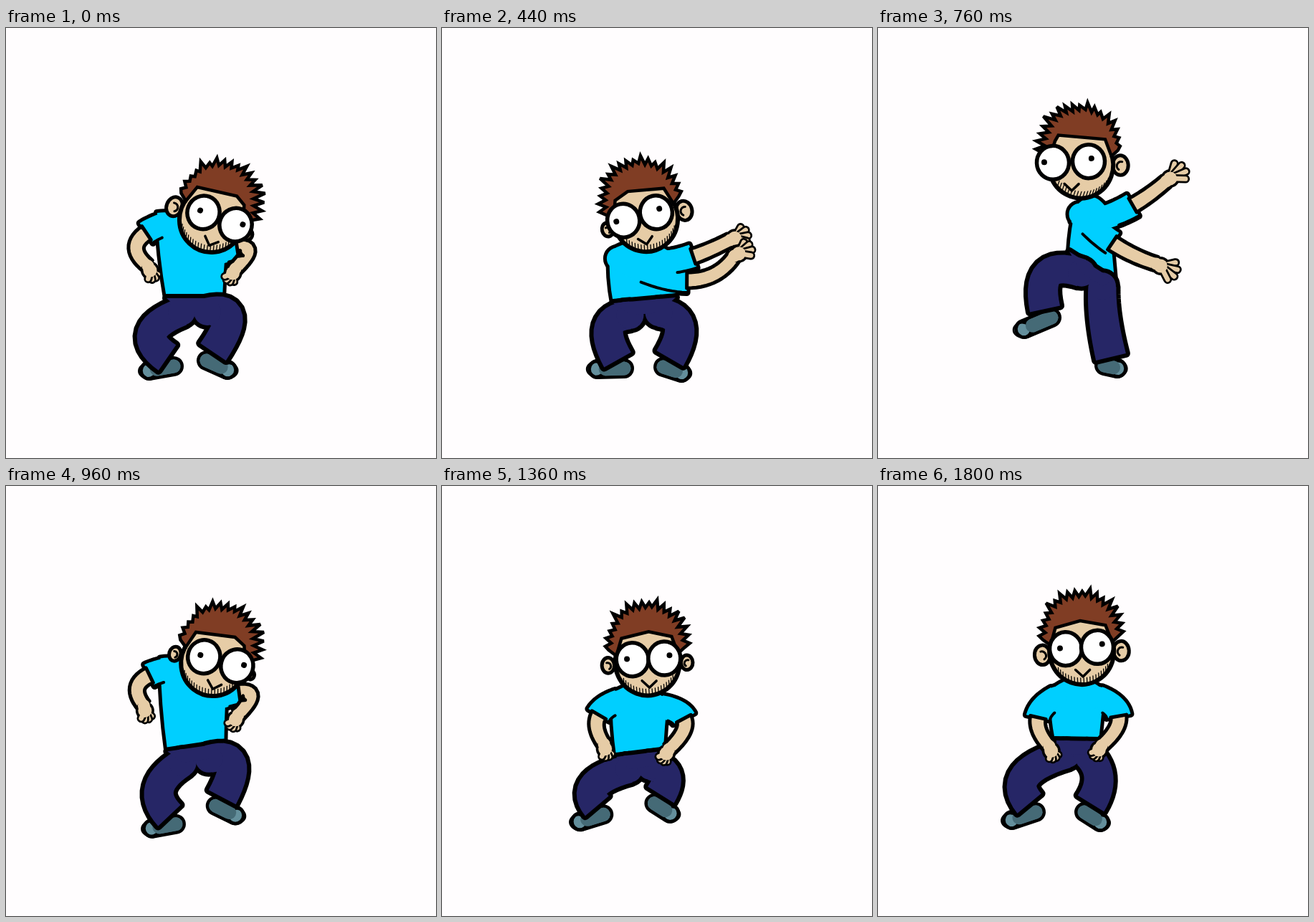
Write an HTML page with a canvas that moves like this. It is 600x600 px and loops after 1.84 s.

```html
<!DOCTYPE html>
<html lang="en">
<head>
<meta charset="utf-8">
<title>Dance</title>
<style>
html, body { margin: 0; width: 100%; height: 100%; overflow: hidden; background: #fffdfe; }
canvas { display: block; width: 100vw; height: 100vh; }
</style>
</head>
<body>
<canvas id="stage" width="600" height="600"></canvas>
<script>
const g = document.getElementById('stage').getContext('2d');
const INK = '#000', SKIN = '#e6cca6', SHIRT = '#00cfff', PANTS = '#262666',
  HAIR = '#803d24', SHOE = '#456a76', TOE = '#648f9c', PAPER = '#fffdfe';
const LOOP = 1840, STEP = 40;

// head: x, y between the eyes, tilt, turn (-1 left, 1 right), ear size
// chest, waist: left and right corner; arms: elbow, wrist; legs: knee, ankle, toe
// cuff: where the sleeve ends along the arm and how far the fingers reach
const crouch = {
  head: [298, 266, 21, .7, 1], chest: [211, 258, 306, 312], waist: [224, 377, 302, 377],
  armA: [183, 300, 198, 332], armB: [336, 308, 320, 336],
  legL: [204, 426, 225, 460, 200, 478], legR: [310, 404, 289, 452, 309, 477], cuff: [.25, 6] };
const reach = {
  head: [298, 188, 0, 1, 1], chest: [236, 256, 302, 258], waist: [221, 358, 302, 324],
  armA: [297, 300, 340, 270], armB: [338, 224, 368, 184],
  legL: [238, 412, 221, 464, 269, 475], legR: [328, 348, 316, 393, 361, 413], cuff: [.45, 20] };
const clap = {
  head: [276, 263, -14, -.5, 1], chest: [234, 312, 325, 318], waist: [239, 384, 326, 376],
  armA: [345, 352, 408, 318], armB: [352, 318, 402, 296],
  legL: [233, 418, 245, 463, 217, 476], legR: [331, 416, 318, 461, 334, 481], cuff: [.48, 12] };
const open = {
  head: [269, 187, -2, -1, 1], chest: [276, 250, 322, 256], waist: [267, 312, 330, 352],
  armA: [330, 302, 388, 329], armB: [358, 246, 402, 214],
  legL: [238, 343, 233, 392, 204, 420], legR: [315, 405, 325, 459, 334, 475], cuff: [.47, 17] };
const kick = {
  head: [303, 186, 1, .5, 0], chest: [228, 192, 308, 240], waist: [229, 352, 311, 308],
  armA: [194, 207, 177, 236], armB: [350, 238, 334, 274],
  legL: [242, 410, 236, 459, 215, 477], legR: [328, 341, 337, 385, 350, 411], cuff: [.25, 6] };
const cross = {
  head: [266, 196, -6, -1, 1], chest: [247, 264, 333, 262], waist: [246, 326, 320, 334],
  armA: [248, 298, 241, 306], armB: [282, 309, 338, 310],
  legL: [231, 355, 226, 402, 190, 416], legR: [312, 402, 324, 456, 335, 475], cuff: [.45, 10] };
const squat = {
  head: [284, 226, -3, 0, 1], chest: [240, 286, 316, 286], waist: [247, 355, 308, 356],
  armA: [223, 325, 239, 363], armB: [336, 323, 312, 362],
  legL: [206, 404, 211, 443, 187, 466], legR: [308, 406, 297, 443, 310, 469], cuff: [.47, 5] };
const swing = { ...cross, head: [270, 192, -4, -.5, 1], armA: [208, 286, 176, 284] };

// Lowers the body while the feet stay.
function sink(pose, by) {
  const down = list => list.map((v, i) => i % 2 ? v + by : v);
  const out = { ...pose };
  for (const k of ['chest', 'waist', 'armA', 'armB']) out[k] = down(pose[k]);
  out.head = pose.head.map((v, i) => i === 1 ? v + by : v);
  for (const k of ['legL', 'legR']) out[k] = pose[k].map((v, i) => i === 1 ? v + by / 2 : v);
  return out;
}

const keys = [[0, crouch], [280, reach], [440, clap], [480, clap], [760, open], [920, crouch],
  [1200, kick], [1380, sink(squat, 30)], [1520, cross], [1680, swing], [1800, squat], [LOOP, crouch]];

// Fast off the floor, faster and faster on the way down.
function poseAt(t) {
  const i = keys.findIndex((k, n) => t < keys[n + 1][0]);
  const [t0, a] = keys[i], [t1, b] = keys[i + 1];
  const k = (t - t0) / (t1 - t0);
  const e = b.head[1] < a.head[1] ? 1 - (1 - k) ** 2 : k * k;
  const p = {};
  for (const part in a) p[part] = a[part].map((v, j) => v + (b[part][j] - v) * e);
  return p;
}

const mix = (a, b, k) => [a[0] + (b[0] - a[0]) * k, a[1] + (b[1] - a[1]) * k];
const dist = (a, b) => Math.hypot(a[0] - b[0], a[1] - b[1]);
const points = flat => flat.flatMap((v, i) => i % 2 ? [] : [[v, flat[i + 1]]]);
const range = (n, f) => Array.from({ length: n }, (_, i) => f(i));
const noise = i => Math.abs(Math.sin(i * 78.233) * 43758.5) % 1;

function shape(pts, closed = true) {
  const path = new Path2D();
  pts.forEach(p => path.lineTo(...p));
  if (closed) path.closePath();
  return path;
}
function oval(x, y, rx, ry = rx) {
  const path = new Path2D();
  path.ellipse(x, y, rx, ry, 0, 0, 7);
  return path;
}
function fill(path, color) { g.fillStyle = color; g.fill(path); }
function line(path, width, color = INK) { g.strokeStyle = color; g.lineWidth = width; g.stroke(path); }
function both(path, color, width) { fill(path, color); line(path, width); }
function merged(paths, color, width) {
  paths.forEach(p => line(p, width));
  paths.forEach(p => fill(p, color));
}

// Both edges of a limb that bends from a through m to b, between t0 and t1.
function limb(a, m, b, w0, w1, t0 = 0, t1 = 1) {
  const c = [0, 1].map(d => 2 * m[d] - (a[d] + b[d]) / 2);
  const edges = [[], []];
  for (let i = 0; i <= 14; i++) {
    const t = t0 + (t1 - t0) * i / 14, w = (w0 + (w1 - w0) * t) / 2;
    const [x, y] = mix(mix(a, c, t), mix(c, b, t), t);
    const q = mix([c[0] - a[0], c[1] - a[1]], [b[0] - c[0], b[1] - c[1]], t);
    const len = Math.hypot(...q) || 1;
    edges[0].push([x - q[1] / len * w, y + q[0] / len * w]);
    edges[1].push([x + q[1] / len * w, y - q[0] / len * w]);
  }
  return edges;
}
const tube = ([l, r]) => shape(l.concat([...r].reverse()));

function shoe([, ankle, toe]) {
  const side = Math.sign(toe[0] - ankle[0]);
  const heel = [ankle[0] - side * 9, ankle[1] + 12];
  const sole = shape([heel, toe], false);
  line(sole, 28);
  line(sole, 19, SHOE);
  const cap = oval(...mix(heel, toe, 1.08), 12, 10);
  both(cap, TOE, 2.5);
  line(oval(...toe, 11.5), 4.5);
  line(shape([heel, mix(heel, toe, .7)], false), 19, SHOE);
}

function legs(p) {
  const [wl, wr] = points(p.waist);
  const hip = k => { const [x, y] = mix(wl, wr, k); return [x, y + 19]; };
  const hips = [hip(.27), hip(.73)];
  const parts = ['legL', 'legR'].map((key, i) => {
    const [knee, ankle] = points(p[key]);
    return tube(limb(hips[i], knee, ankle, 39, 43));
  });
  const pelvis = shape([wl, wr, mix(hips[1], wr, .2), hips[1], hips[0], mix(hips[0], wl, .2)]);
  merged([...parts, ...hips.map(h => oval(...h, 19)), pelvis], PANTS, 12);
}

function hand(elbow, wrist, len) {
  const a = Math.atan2(wrist[1] - elbow[1], wrist[0] - elbow[0]);
  const at = (r, f) => [wrist[0] + 7 * Math.cos(a) + r * Math.cos(f), wrist[1] + 7 * Math.sin(a) + r * Math.sin(f)];
  fill(oval(...at(0, 0), 13), INK);
  for (let i = 0; i < 4; i++) {
    const f = a + (i - 1.5) * .44;
    const finger = shape([at(4, f), at(7 + len * (i % 3 ? 1 : .85), f)], false);
    line(finger, 12);
    line(finger, 6.5, SKIN);
  }
  fill(oval(...at(0, 0), 9.5), SKIN);
  fill(oval(...wrist, 8.5), SKIN);
}

function shirtAndArms(p) {
  const [cl, cr] = points(p.chest), [wl, wr] = points(p.waist), [cuff, len] = p.cuff;
  const mid = mix(mix(wl, wr, .5), mix(cl, cr, .5), .5);
  const arms = [['armA', .12], ['armB', .88]].map(([key, k]) => {
    const [elbow, wrist] = points(p[key]), [x, y] = mix(cl, cr, k), from = [x, y + 9];
    return { elbow, wrist, from, sleeve: limb(from, elbow, wrist, 32, 36, 0, cuff),
      skin: limb(from, elbow, wrist, 24, 20, cuff) };
  });
  const torso = new Path2D(), neck = mix(cl, cr, .5);
  torso.moveTo(...wl);
  torso.quadraticCurveTo(...mix(mid, mix(wl, cl, .5), 1.1), ...cl);
  torso.quadraticCurveTo(neck[0], neck[1] - 34, ...cr);
  torso.quadraticCurveTo(...mix(mid, mix(wr, cr, .5), .98), ...wr);
  torso.closePath();
  merged([torso, ...arms.flatMap(a => [tube(a.sleeve), oval(...a.from, 15)])], SHIRT, 10);
  arms.forEach(({ sleeve }) => {
    const inner = sleeve[dist(sleeve[0][7], mid) < dist(sleeve[1][7], mid) ? 0 : 1];
    line(shape(inner.slice(5), false), 4);
  });
  legs(p);
  arms.reverse().forEach(a => {
    both(tube(a.skin), SKIN, 5);
    hand(a.elbow, a.wrist, len);
  });
}

function head([x, y, tilt, turn, earSize]) {
  const cx = -14 * turn;
  g.save();
  g.translate(x, y);
  g.rotate(tilt * Math.PI / 180);

  for (const side of [-1, 1]) {
    const r = 11 * earSize * Math.min(1, Math.sqrt(Math.max(0, 1 - side * turn)));
    if (r < 3) continue;
    const ex = cx + side * 55, curl = new Path2D();
    both(oval(ex, 7, r, r * 1.25), SKIN, 5);
    curl.arc(ex + side, 8, r * .55, side > 0 ? 2.2 : -1.8, side > 0 ? 5 : 1);
    line(curl, 3);
  }

  const jaw = new Path2D();
  jaw.ellipse(cx, 5, 45, 46, 0, -.4, Math.PI + .4);
  fill(oval(cx, 5, 45, 46), SKIN);
  line(jaw, 6);
  range(19, i => .65 + i * .1).forEach(a => {
    const px = cx + 44 * Math.cos(a), py = 5 + 45 * Math.sin(a);
    line(shape([[px, py], [px - 3 * turn, py - 8]], false), 1.3);
  });

  const brow = [[cx + 43, -6], [cx + 35, -30], [16 * turn, -38], [cx - 35, -30], [cx - 43, -6]];
  fill(shape(brow), SKIN);
  // Tufts comb toward the side the face looks at.
  const tufts = range(37, i => {
    const a = Math.PI * (1 + i / 36), out = i % 2 ? 2 + 9 * noise(i) : -2 - 3 * noise(i);
    return [cx + (55 + out) * Math.cos(a) + (i % 2 ? 4 * turn : 0), -14 + (62 + out) * Math.sin(a)];
  });
  g.lineJoin = 'miter';
  g.miterLimit = 3;
  both(shape([...tufts, ...brow]), HAIR, 4.5);
  g.lineJoin = 'round';

  const gap = 22 + 3 * Math.abs(turn);
  for (const side of [-1, 1]) both(oval(side * gap, 0, 22.5, 23.5), '#fff', 5.5);
  fill(oval(-gap - 8 + 4 * turn, -1, 4), INK);
  fill(oval(gap + 7 + 3 * turn, -4, 4), INK);
  line(shape([[-10, 30], [0, 40], [10, 31]], false), 3.5);
  g.restore();
}

function draw(t) {
  const p = poseAt(t);
  fill(shape([[0, 0], [600, 0], [600, 600], [0, 600]]), PAPER);
  g.lineJoin = g.lineCap = 'round';
  shoe(points(p.legL));
  shoe(points(p.legR));
  shirtAndArms(p);
  head(p.head);
}

const start = performance.now();
function tick() {
  const t = (performance.now() - start) % LOOP;
  draw(Math.floor(t / STEP) * STEP);
  requestAnimationFrame(tick);
}
tick();
</script>
</body>
</html>
```
